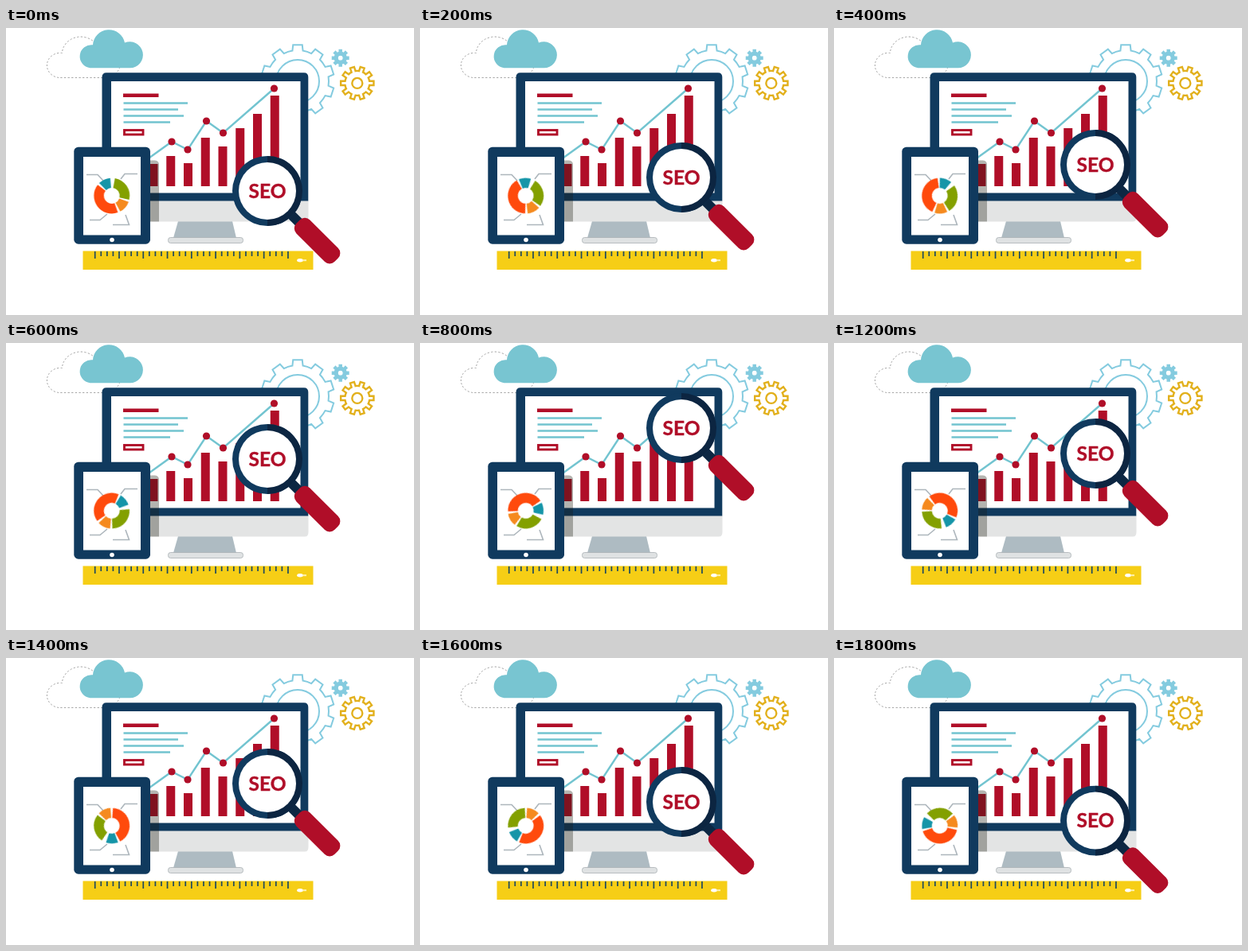
These frames come from a looping animation (512x361 px, 2 s). An HTML page:

```html
<!DOCTYPE html>
<html lang="en">
<head>
<meta charset="utf-8">
<title>SEO desk</title>
<style>
  html, body { margin: 0; width: 100%; height: 100%; overflow: hidden; background: #fff; }
  svg { display: block; width: 512px; height: 361px; }
  .navy { fill: #103a5e; }
  .red { fill: #b00e28; }
  .white { fill: #fff; }
  .line { fill: none; stroke: #72c4d0; stroke-width: 2.4; }
  .lens { animation: lift 2s step-end infinite; }
  .donut { animation: spin 2s step-end infinite; }
  .donut path { fill: none; stroke-width: 12.5; }
  .lens text {
    font: 700 24.5px Lato, "Open Sans", sans-serif;
    text-anchor: middle;
    stroke: #b00e28;
    stroke-width: .4;
  }

  @keyframes lift {
    0% { transform: translate(328px, 205px); }
    10% { transform: translate(328px, 188px); }
    20% { transform: translate(328px, 172px); }
    30% { transform: translate(328px, 146px); }
    40% { transform: translate(328px, 107px); }
    50% { transform: translate(328px, 122px); }
    60% { transform: translate(328px, 139px); }
    70% { transform: translate(328px, 158px); }
    80% { transform: translate(328px, 181px); }
    90%, 100% { transform: translate(328px, 204.5px); }
  }
  @keyframes spin {
    0% { transform: rotate(0deg); }
    10% { transform: rotate(22deg); }
    20% { transform: rotate(45deg); }
    30% { transform: rotate(75deg); }
    40% { transform: rotate(108deg); }
    50% { transform: rotate(136deg); }
    60% { transform: rotate(164deg); }
    70% { transform: rotate(204deg); }
    80% { transform: rotate(254deg); }
    90%, 100% { transform: rotate(304deg); }
  }
</style>
</head>
<body>
<svg viewBox="0 0 512 361">
  <defs>
    <path id="cloud" d="M14.500 49.500A14.600 14.600 0 1 1 18 20.500A20.200 20.200 0 0 1 58 17.800A16.500 16.500 0 1 1 64.500 49.500Z"/>
  </defs>

  <!-- clouds -->
  <use href="#cloud" transform="translate(49.5 9.5) scale(1.16 1.07)" fill="#fff" stroke="#999" stroke-width=".8" stroke-dasharray="2 2"/>
  <use href="#cloud" transform="translate(91 .8)" fill="#78c5d1"/>

  <!-- gears -->
  <g id="gears"></g>

  <!-- monitor -->
  <path d="M216 243H284L289 264H210Z" fill="#aebbc2"/>
  <rect x="203.500" y="263.500" width="94" height="7" rx="3" fill="#dfe2e3" stroke="#aab0b4" stroke-width=".8"/>
  <path d="M121 217H379.500V238Q379.500 243.500 375 243.500H121Z" fill="#e3e4e4"/>
  <path class="navy" d="M120.500 217.500V62Q120.500 56.300 126 56.300H374Q379.300 56.300 379.300 62V217.500Z"/>
  <path class="white" d="M132 67H369.500V207.500H132Z"/>

  <!-- report -->
  <path class="red" d="M147 82.500H191.500V87H147Z"/>
  <path class="line" d="M147.500 94.500H228M147.500 102.500H216M147.500 110.500H223M147.500 118.500H206"/>
  <rect x="148.500" y="128.500" width="23.500" height="5.500" fill="none" stroke="#b00e28" stroke-width="2.900"/>
  <g id="bars" class="red"></g>
  <path class="line" d="M176 166L208 143L228 153L251.500 117L272.500 132L336.500 76"/>
  <g id="dots" class="red"></g>

  <!-- tablet -->
  <path d="M180 166.500H187Q192 167 192 172V243.500H180Z" fill="#1c1a10" fill-opacity=".33"/>
  <rect class="navy" x="85.300" y="149.700" width="95.700" height="122" rx="5.500"/>
  <path class="white" d="M97 162H169V260.500H97Z"/>
  <circle class="white" cx="133" cy="266.500" r="2.800"/>
  <path d="M101 184.500H115L122 192M165 183.500H149L144 190M105 241.500H118L127 234M134 247.500H154.500L150 235" fill="none" stroke="#adb6bc" stroke-width="1.600"/>
  <g transform="translate(132.700 211)"><g id="donut" class="donut"></g></g>

  <!-- ruler -->
  <path d="M96.500 280.500H385.500V304H96.500Z" fill="#f6ce16"/>
  <path id="ticks" fill="none" stroke="#1f4a5e" stroke-width="1.700"/>
  <ellipse class="white" cx="369" cy="292.200" rx="3.800" ry="2.200"/>
  <path d="M372 292.200H377" stroke="#fff3b0" stroke-width="2"/>

  <!-- magnifier -->
  <g class="lens">
    <path d="M26 26L42 42" stroke="#0d2743" stroke-width="12"/>
    <rect class="red" x="54.500" y="-12" width="68" height="24" rx="9" transform="rotate(45)"/>
    <circle class="navy" r="44"/>
    <path d="M0 -44A44 44 0 0 1 0 44Z" fill="#0c2541"/>
    <circle class="white" r="36"/>
    <text class="red" y="8.800">SEO</text>
  </g>
</svg>
<script>
  const SVG = "http://www.w3.org/2000/svg";
  const $ = id => document.getElementById(id);

  function add(parent, tag, attrs) {
    const el = document.createElementNS(SVG, tag);
    for (const key in attrs) el.setAttribute(key, attrs[key]);
    $(parent).append(el);
  }

  // Angles run clockwise in degrees from the top.
  function polar(r, deg) {
    const a = deg * Math.PI / 180;
    return (r * Math.sin(a)).toFixed(2) + " " + (-r * Math.cos(a)).toFixed(2);
  }

  function gear({ x, y, outer, root, hole, teeth, phase = 0, width = 2, stroke, fill = "none" }) {
    const step = 360 / teeth;
    const at = (r, k) => polar(r, (k + phase) * step);
    let d = "";
    for (let i = 0; i < teeth; i++) {
      d += `${i ? "L" : "M"}${at(root, i - .27)}L${at(outer, i - .2)}L${at(outer, i + .2)}L${at(root, i + .27)}`;
      d += `A${root} ${root} 0 0 1 ${at(root, i + .73)}`;
    }
    const shared = { transform: `translate(${x} ${y})`, stroke, "stroke-width": width };
    add("gears", "path", { ...shared, d: d + "Z", fill });
    add("gears", "circle", { ...shared, r: hole, fill: "#fff" });
  }

  const sky = "#84cbdf";
  gear({ x: 366, y: 67, outer: 46, root: 39, hole: 27, teeth: 10, stroke: sky });
  gear({ x: 419.700, y: 37.700, outer: 10.500, root: 7.500, hole: 3.500, teeth: 8, width: 1.200, stroke: sky, fill: sky });
  gear({ x: 440.800, y: 69.400, outer: 20.800, root: 15.500, hole: 6.500, teeth: 10, phase: .5, width: 2.400, stroke: "#e2b01c" });

  [171, 161, 170, 138, 149, 126, 108, 85].forEach((y, i) =>
    add("bars", "rect", { x: 179.5 + i * 21.75, y, width: 11, height: 199 - y }));

  [[208, 143], [228, 153], [251.5, 117], [272.5, 132], [336.5, 76]].forEach(([cx, cy]) =>
    add("dots", "circle", { cx, cy, r: 4.6 }));

  [[160, 308, "#ff4a0c"], [315, 355, "#1595a8"], [10, 103, "#83a000"], [110, 152, "#f58a1f"]]
    .forEach(([from, to, stroke]) =>
      add("donut", "path", { d: `M${polar(16.2, from)}A16.2 16.2 0 0 1 ${polar(16.2, to)}`, stroke }));

  let d = "";
  for (let i = 0; i <= 32; i++) d += `M${(111.7 + i * 7.57).toFixed(2)} 281v${i % 4 ? 6 : 9}`;
  $("ticks").setAttribute("d", d);
</script>
</body>
</html>
```
